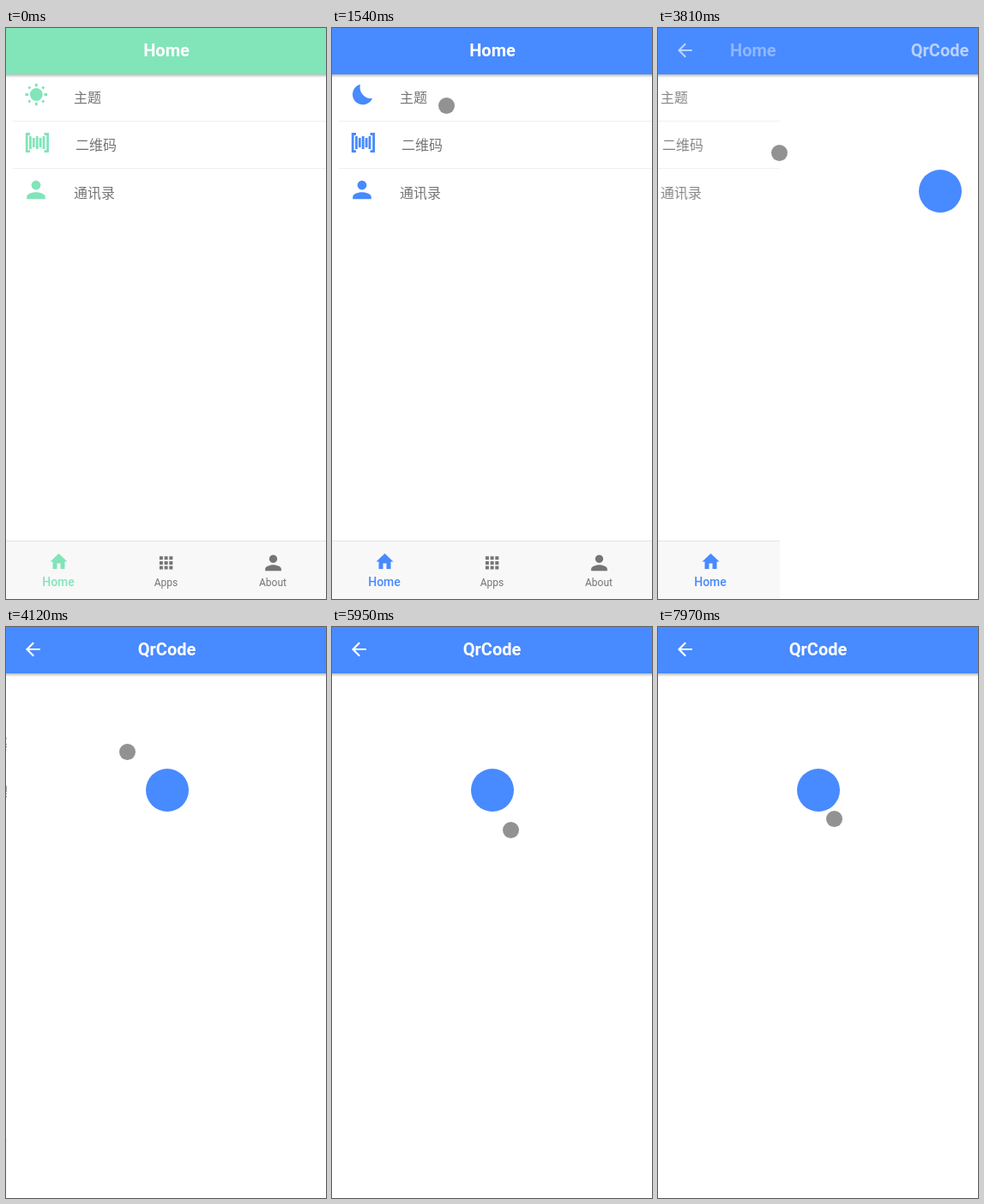
These frames come from a looping animation (373 by 665 pixels, 8 s). An HTML page:

```html
<!DOCTYPE html>
<html lang="zh-CN">
<head>
<meta charset="utf-8">
<style>
html, body { margin: 0; width: 100%; height: 100%; overflow: hidden; background: #fff; }
svg { display: block; width: 373px; height: 665px; font-family: Roboto, sans-serif; }
.title { font-size: 20px; font-weight: 700; fill: #fff; text-anchor: middle; }
.item { font: 16px "Noto Sans CJK SC", "Noto Sans CJK", sans-serif; fill: #757575; }
.tab { font-size: 12px; fill: #757575; text-anchor: middle; }
.active { font-size: 14px; font-weight: 500; }
.theme, .active { fill: currentColor; }
</style>
</head>
<body>
<svg id="stage" viewBox="0 0 373 665">
  <defs>
    <linearGradient id="shadow" x2="0" y2="1">
      <stop stop-opacity=".26"/><stop offset="1" stop-opacity="0"/>
    </linearGradient>
    <path id="person" d="M0 0c2.21 0 4-1.79 4-4s-1.79-4-4-4-4 1.79-4 4 1.79 4 4 4zm0 2c-2.67 0-8 1.34-8 4v2h16v-2c0-2.66-5.33-4-8-4z"/>
  </defs>

  <g id="list">
    <path d="M8 108.5H373M8 163.5H373" stroke="#efefef"/>
    <g class="theme">
      <g id="sun" transform="translate(35.3 77.5)">
        <circle r="7.4"/>
        <path id="rays" stroke="currentColor" stroke-width="2.9"/>
      </g>
      <path id="moon" d="M33 65.7A12 12 0 1 0 47 82A13 13 0 0 1 33 65.7"/>
      <path d="M28 123.5H24.2V143.6H28M44.5 123.5H48.6V143.6H44.5" fill="none" stroke="currentColor" stroke-width="2.8"/>
      <path d="M28.4 126v15M32.3 128v11M36.2 126v15M40.1 128v11M44 126v15" stroke="currentColor" stroke-width="2.8"/>
      <use href="#person" transform="translate(35 188.5) scale(1.35)"/>
    </g>
    <g class="item">
      <text x="79" y="87">主题</text>
      <text x="81" y="142">二维码</text>
      <text x="79" y="198">通讯录</text>
    </g>
  </g>

  <rect y="597" width="373" height="68" fill="#f8f8f8"/>
  <path d="M0 597.5H373" stroke="#e2e2e2"/>
  <path class="theme" transform="translate(61.5 621)" d="M-2 9v-6.4h4v6.4h5v-8.4h3L0 -9-10 .6h3V9z"/>
  <path id="dots" fill="#757575"/>
  <use href="#person" transform="translate(311.5 623) scale(1.17)" fill="#757575"/>
  <text class="tab active" x="61" y="650">Home</text>
  <text class="tab" x="186.5" y="650">Apps</text>
  <text class="tab" x="311" y="650">About</text>

  <g id="page">
    <rect width="373" height="665" fill="#fff"/>
    <circle cx="187" cy="190" r="25" fill="#488aff"/>
  </g>

  <rect class="theme" width="373" height="54"/>
  <rect y="54" width="373" height="4" fill="url(#shadow)"/>
  <text id="homeTitle" class="title" x="187" y="33">Home</text>
  <text id="pageTitle" class="title" x="186.5" y="33">QrCode</text>
  <path id="back" fill="#fff" transform="translate(31.4 26) scale(1.05)" d="M8-1H-4.17l5.59-5.59L0-8l-8 8 8 8 1.41-1.41L-4.17 1H8z"/>
  <circle id="pointer" r="9.5" fill="#737373" fill-opacity=".78"/>
</svg>
<script>
const LOOP = 8000, TICK = 77.4, WIDTH = 373;
const el = id => document.getElementById(id);
const set = (id, attrs) => {
  for (const name in attrs) el(id).setAttribute(name, attrs[name]);
};
const clamp = v => Math.min(1, Math.max(0, v));
const smooth = v => v * v * (3 - 2 * v);

// Pointer moves: first tick, last tick, end point
const start = [278.5, 617.5];
const moves = [
  [6, 16, 133.5, 90.5],
  [29, 35, 141.5, 145.5],
  [57, 63, 208.5, 236.5],
  [102, 103, 205.5, 223.5]
];

// cubic-bezier(.36, .66, .04, 1)
function pageEase(x) {
  const curve = (s, a, b) => 3 * a * s * (1 - s) ** 2 + 3 * b * s * s * (1 - s) + s ** 3;
  let low = 0, high = 1;
  for (let i = 0; i < 24; i++) {
    const mid = (low + high) / 2;
    if (curve(mid, .36, .04) < x) low = mid; else high = mid;
  }
  return curve(low, .66, 1);
}

function pointerAt(tick) {
  let [x, y] = start;
  for (const [from, to, endX, endY] of moves) {
    const p = smooth(clamp((tick - from) / (to - from)));
    x += (endX - x) * p;
    y += (endY - y) * p;
  }
  return [x, y];
}

let rays = "";
for (let i = 0; i < 8; i++) {
  const angle = i * Math.PI / 4;
  const [inner, outer] = i % 2 ? [10, 12.6] : [9.2, 12.8];
  const point = r => `${r * Math.cos(angle)} ${r * Math.sin(angle)}`;
  rays += `M${point(inner)}L${point(outer)}`;
}
set("rays", { d: rays });

let dots = "";
for (let i = 0; i < 9; i++) {
  dots += `M${178.9 + i % 3 * 5.7} ${615.2 + Math.floor(i / 3) * 5.7}h4v4h-4z`;
}
set("dots", { d: dots });

function draw(now) {
  const t = now % LOOP;
  const tick = Math.floor((t + 10) / TICK);
  const blue = t >= 1540;
  el("stage").style.color = blue ? "#488aff" : "#82e4b9";
  set("sun", { visibility: blue ? "hidden" : "visible" });
  set("moon", { visibility: blue ? "visible" : "hidden" });

  const p = pageEase(clamp((tick * TICK - 3680) / 500));
  const leave = `translate(${-.33 * WIDTH * p})`;
  const enter = `translate(${Math.round(WIDTH * (1 - p))})`;
  set("list", { transform: leave, opacity: 1 - .2 * p });
  set("homeTitle", { transform: leave, opacity: 1 - p });
  set("page", { transform: enter });
  set("pageTitle", { transform: enter, opacity: p });
  set("back", { opacity: p });

  const [cx, cy] = pointerAt(tick);
  set("pointer", { cx, cy, visibility: tick < 6 ? "hidden" : "visible" });
  requestAnimationFrame(() => draw(performance.now()));
}
draw(performance.now());
</script>
</body>
</html>
```
